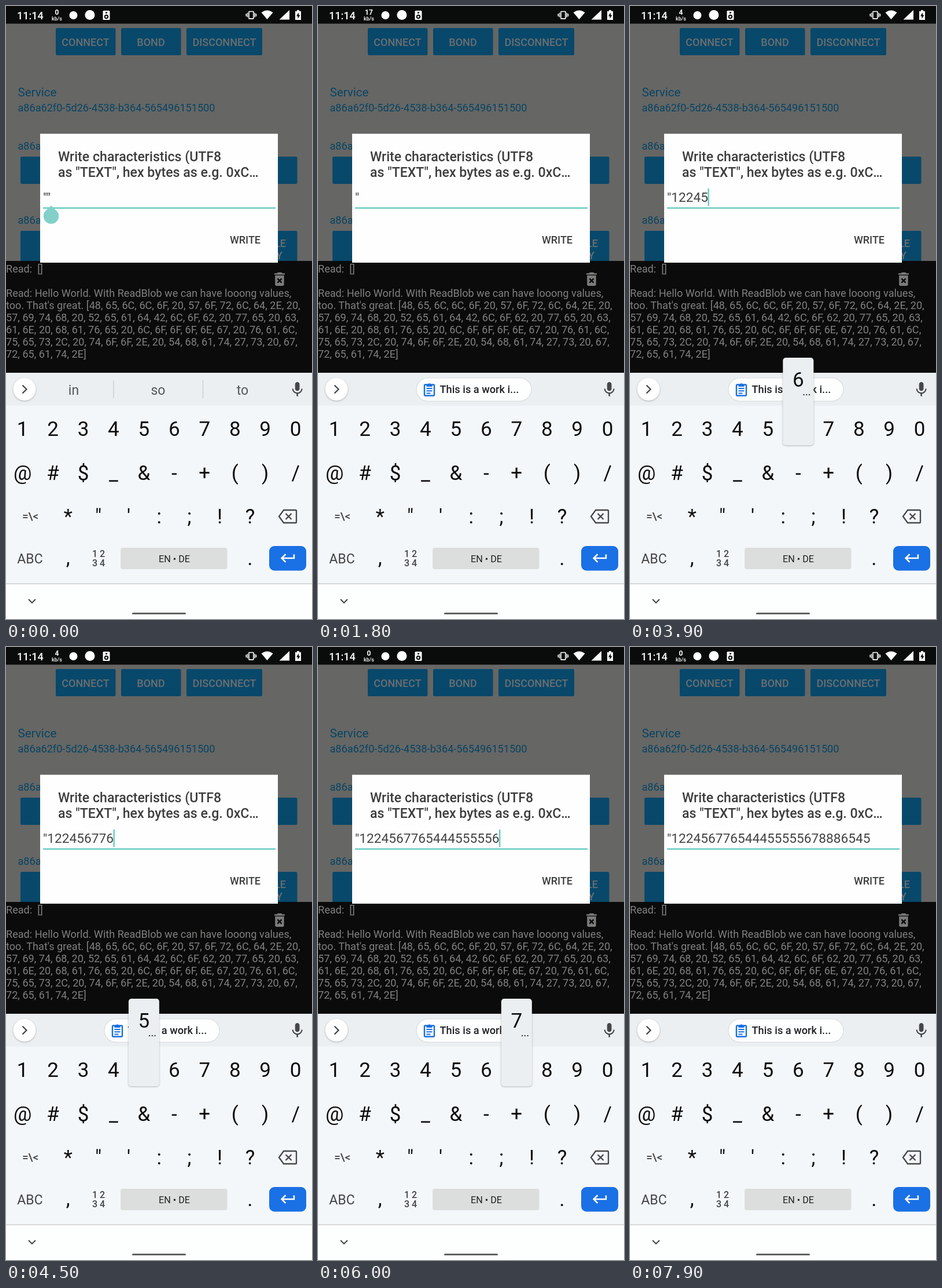
An HTML page for the animation above (8 s loop, 529x1058 px).

```html
<!DOCTYPE html>
<html lang="en">
<head>
<meta charset="utf-8">
<title>Write characteristics dialog</title>
<style>
  html, body { margin: 0; width: 100%; height: 100%; overflow: hidden; background: #666664; }
  svg { display: block; width: 100%; height: 100%; font-family: Roboto, sans-serif; }
  text { white-space: pre; }
  .medium { font-weight: 500; }
  .mid { text-anchor: middle; }
  .body { font-size: 18.1px; }
  .button { fill: #08486a; }
  .link { fill: #084564; }
  .label { fill: #6a6e70; font-size: 18px; font-weight: 500; }
  .key { font-size: 35px; fill: #0c0d0e; text-anchor: middle; }
  .line { fill: none; stroke: #454749; stroke-width: 2.3; }
  .soft { filter: drop-shadow(0 1px 1.5px #0004); }
</style>
</head>
<body>
<svg viewBox="0 0 529 1058">
  <rect width="529" height="1058" fill="#666664"/>

  <!-- status bar -->
  <rect width="529" height="30.5" fill="#0a0c0b"/>
  <g fill="#fff">
    <text class="medium" x="19" y="22.5" font-size="18">11:14</text>
    <text id="rate" class="mid" x="88" y="15" font-size="12" font-weight="700">0</text>
    <text class="mid medium" x="88" y="25" font-size="9">kb/s</text>
    <circle cx="116.500" cy="16" r="7"/>
    <circle cx="145" cy="15.500" r="8.500"/>
    <rect x="167.500" y="8" width="12" height="16" rx="1.500"/>
    <path transform="translate(414.500 6.300) scale(.78)" d="M0 15h2V9H0zM3 17h2V7H3zM22 9v6h2V9zM19 17h2V7h-2zM16.500 3h-9Q6 3 6 4.500v15Q6 21 7.500 21h9q1.500 0 1.500-1.500v-15Q18 3 16.500 3zM16 19H8V5h8z"/>
    <path d="M451.500 23L441.500 11.300Q451.500 3.500 461.500 11.300ZM490 7V23.500H472.500Z"/>
    <path d="M503 7h4v2h3v15h-10V9h3z"/>
  </g>
  <g fill="#0a0c0b">
    <circle cx="173.500" cy="11.500" r="1.600"/>
    <circle cx="173.500" cy="18.500" r="3.700"/>
    <path d="M506 11l-4 6.500h2.500V22l4-6.500H506z"/>
  </g>
  <circle cx="173.500" cy="18.500" r="1.700" fill="#fff"/>

  <!-- dimmed page -->
  <g class="button">
    <rect x="86" y="38" width="103.500" height="47" rx="2.500"/>
    <rect x="199" y="38" width="103.500" height="47" rx="2.500"/>
    <rect x="312" y="38" width="131" height="47" rx="2.500"/>
    <rect x="25" y="260" width="478.500" height="47" rx="2.500"/>
    <rect x="25" y="388" width="478.500" height="60" rx="2.500"/>
  </g>
  <g class="label">
    <text class="mid" x="137.500" y="68.500">CONNECT</text>
    <text class="mid" x="250.500" y="68.500">BOND</text>
    <text class="mid" x="377.500" y="68.500">DISCONNECT</text>
    <text x="484" y="415.500" text-anchor="end">ENABLE</text>
    <text x="478" y="436.500" text-anchor="end">NOTIFY</text>
  </g>
  <g class="link body">
    <text x="20.500" y="156" font-size="20.600">Service</text>
    <text x="20.500" y="181.500">a86a62f0-5d26-4538-b364-565496151500</text>
    <text x="20.500" y="247.500">a86a</text>
    <text x="20.500" y="375.500">a86a</text>
  </g>
  <rect y="440" width="529" height="194" fill="#0a0b0a"/>
  <g id="log" class="body" fill="#80807f"></g>
  <path fill="#7c7c7b" transform="translate(457.500 456) scale(1.286)" d="M6 19c0 1.100.9 2 2 2h8c1.100 0 2-.9 2-2V7H6v12zm2.460-7.120 1.410-1.410L12 12.590l2.120-2.120 1.410 1.410L13.410 14l2.120 2.120-1.410 1.410L12 15.410l-2.120 2.120-1.410-1.410L10.590 14l-2.130-2.120zM15.500 4l-1-1h-5l-1 1H5v2h14V4z"/>

  <!-- dialog -->
  <rect x="59" y="220.500" width="411" height="222.500" fill="#fdfefd"/>
  <g class="medium" fill="#3c3d3d">
    <text x="90" y="268" font-size="23.100">Write characteristics (UTF8</text>
    <text x="90" y="295" font-size="23.100">as "TEXT", hex bytes as e.g. 0xC…</text>
    <text x="387" y="410" font-size="18">WRITE</text>
  </g>
  <rect x="64" y="347.500" width="402" height="2.300" fill="#63c8c2"/>
  <text id="input" x="64" y="338.300" font-size="22.700" fill="#424343"></text>
  <rect id="caret" y="315" width="2.300" height="30" fill="#63c8c2"/>
  <path id="handle" fill="#82d0c9" d="M78 344.500L87.300 353.300A13.200 13.200 0 1 1 68.700 353.300Z"/>

  <!-- keyboard -->
  <rect y="633" width="529" height="57" fill="#eceff1"/>
  <rect y="689.500" width="529" height="307" fill="#f4f7f9"/>
  <rect y="996" width="529" height="1.500" fill="#dfe2e4"/>
  <rect y="997.500" width="529" height="60.500" fill="#fdfefe"/>
  <circle class="soft" cx="32" cy="661.500" r="19.500" fill="#fff"/>
  <path class="line" d="M28.500 654.500l7 7-7 7"/>
  <path fill="#454749" transform="translate(488.200 646.400) scale(1.286)" d="M12 14c1.660 0 3-1.340 3-3V5c0-1.660-1.340-3-3-3S9 3.340 9 5v6c0 1.660 1.340 3 3 3zm5.300-3c0 3-2.540 5.100-5.300 5.100S6.700 14 6.700 11H5c0 3.410 2.720 6.230 6 6.720V21h2v-3.280c3.280-.48 6-3.300 6-6.720z"/>
  <g id="words" class="mid" font-size="23" fill="#55585a">
    <text x="117" y="670.500">in</text>
    <text x="263" y="670.500">so</text>
    <text x="409" y="670.500">to</text>
    <path d="M186 646v31M340.500 646v31" stroke="#c6cacc" stroke-width="1.300"/>
  </g>
  <g id="chip">
    <rect x="170" y="642" width="199" height="40" rx="20" fill="#fdfefe" stroke="#d8dbdd" stroke-width="1.200"/>
    <g fill="none" stroke="#1a6fe0" stroke-width="2.400">
      <rect x="184" y="653.500" width="17" height="19" rx="1.500"/>
      <path d="M187.500 660h10M187.500 664.200h10M187.500 668.400h7" stroke-width="2"/>
    </g>
    <path d="M187.500 653h2.500a2.700 2.700 0 0 1 5 0h2.500v4h-10z" fill="#1a6fe0"/>
    <text class="medium" x="210.500" y="668" font-size="18.200" fill="#202124">This is a work i...</text>
  </g>
  <rect id="press" x="449" y="852" width="74" height="58" rx="6" fill="#dadddf"/>
  <g id="keys" class="key"></g>
  <path class="line" d="M480 870h20.500q1.500 0 1.500 1.500v19q0 1.500-1.500 1.500H480L472 881ZM483.500 876l10 10M493.500 876l-10 10"/>
  <g class="mid" fill="#424446">
    <text class="medium" x="42" y="887" font-size="19">=\&lt;</text>
    <text x="41.500" y="961.500" font-size="23">ABC</text>
    <text class="medium" x="160" y="950.500" font-size="16">1 2</text>
    <text class="medium" x="160" y="967" font-size="16">3 4</text>
  </g>
  <rect x="198" y="935" width="184.500" height="37" rx="4" fill="#dcdedd"/>
  <text class="mid" x="291" y="959.500" font-size="16.200" fill="#202124">EN • DE</text>
  <rect x="455" y="932" width="64" height="42.500" rx="9" fill="#1a70e5"/>
  <path fill="#fff" transform="translate(472.200 937.600) scale(1.286)" d="M19 7v4H5.830l3.580-3.590L8 6l-6 6 6 6 1.410-1.410L5.830 13H21V7z"/>
  <path class="line" d="M39 1024l6 6 6-6" style="stroke-width:2"/>
  <rect x="218" y="1047" width="93" height="3" rx="1.500" fill="#606263"/>

  <g id="popup">
    <rect class="soft" x="-26.500" y="607" width="53" height="151" rx="5" fill="#eceff1"/>
    <text id="popupDigit" class="key" y="656.500"></text>
    <text class="mid medium" x="14.500" y="671.500" font-size="17" fill="#2a2c2e">...</text>
  </g>
</svg>
<script>
const $ = id => document.getElementById(id);
const LOOP = 8000, DELETE_AT = 300, CHIP_AT = 400;
const typed = "122456776544455555678886545";
const tapTimes = [3000, 3200, 3400, 3620, 3820, 4000, 4150, 4280, 4400, 4560, 4720, 4880, 5020, 5180,
  5330, 5480, 5620, 5760, 5940, 6100, 6260, 6380, 6500, 6640, 6800, 6970, 7150];
const rates = [[4800, 0], [3800, 4], [2800, 0], [1800, 17], [0, 0]];
const keyX = column => 28.6 + 52.45 * column;

function addText(parent, content, x, y) {
  const node = document.createElementNS(parent.namespaceURI, "text");
  node.textContent = content;
  node.setAttribute("x", x);
  node.setAttribute("y", y);
  parent.append(node);
}

[
  "Read:  []",
  "",
  "Read: Hello World. With ReadBlob we can have looong values,",
  "too. That's great. [48, 65, 6C, 6C, 6F, 20, 57, 6F, 72, 6C, 64, 2E, 20,",
  "57, 69, 74, 68, 20, 52, 65, 61, 64, 42, 6C, 6F, 62, 20, 77, 65, 20, 63,",
  "61, 6E, 20, 68, 61, 76, 65, 20, 6C, 6F, 6F, 6F, 6E, 67, 20, 76, 61, 6C,",
  "75, 65, 73, 2C, 20, 74, 6F, 6F, 2E, 20, 54, 68, 61, 74, 27, 73, 20, 67,",
  "72, 65, 61, 74, 2E]"
].forEach((line, i) => addText($("log"), line, 0, 459.5 + 21.1 * i));

[
  ["1234567890", 0, 742],
  ["@#$_&-+()/", 0, 817.5],
  ["*\"':;!?", 1.5, 893]
].forEach(([row, first, y]) =>
  [...row].forEach((key, i) => addText($("keys"), key, keyX(first + i), y)));
addText($("keys"), ",", keyX(1.5), 964);
addText($("keys"), ".", keyX(7.5), 965);

const show = (id, on) => $(id).setAttribute("visibility", on ? "visible" : "hidden");

function render(t) {
  const count = tapTimes.filter(time => time <= t).length;
  const lastEdit = count ? tapTimes[count - 1] : DELETE_AT;
  const edited = t >= DELETE_AT;

  $("input").textContent = edited ? '"' + typed.slice(0, count) : '""';
  $("caret").setAttribute("x", 63.5 + $("input").getComputedTextLength());
  show("caret", edited && (t - lastEdit) % 1000 < 500);
  show("handle", !edited);
  show("press", t >= 100 && t < DELETE_AT + 50);
  show("words", t < CHIP_AT);
  show("chip", t >= CHIP_AT);
  $("rate").textContent = rates.find(([start]) => t >= start)[1];

  // The preview opens on touch; the digit is entered on release.
  const tap = tapTimes.findIndex(time => t >= time - 120 && t < time + 40);
  show("popup", tap >= 0);
  if (tap >= 0) {
    const digit = typed[tap];
    $("popup").setAttribute("transform", `translate(${keyX(digit - 1)} 0)`);
    $("popupDigit").textContent = digit;
  }
}

const start = performance.now();
function frame() {
  render((performance.now() - start) % LOOP);
  requestAnimationFrame(frame);
}
frame();
</script>
</body>
</html>
```
